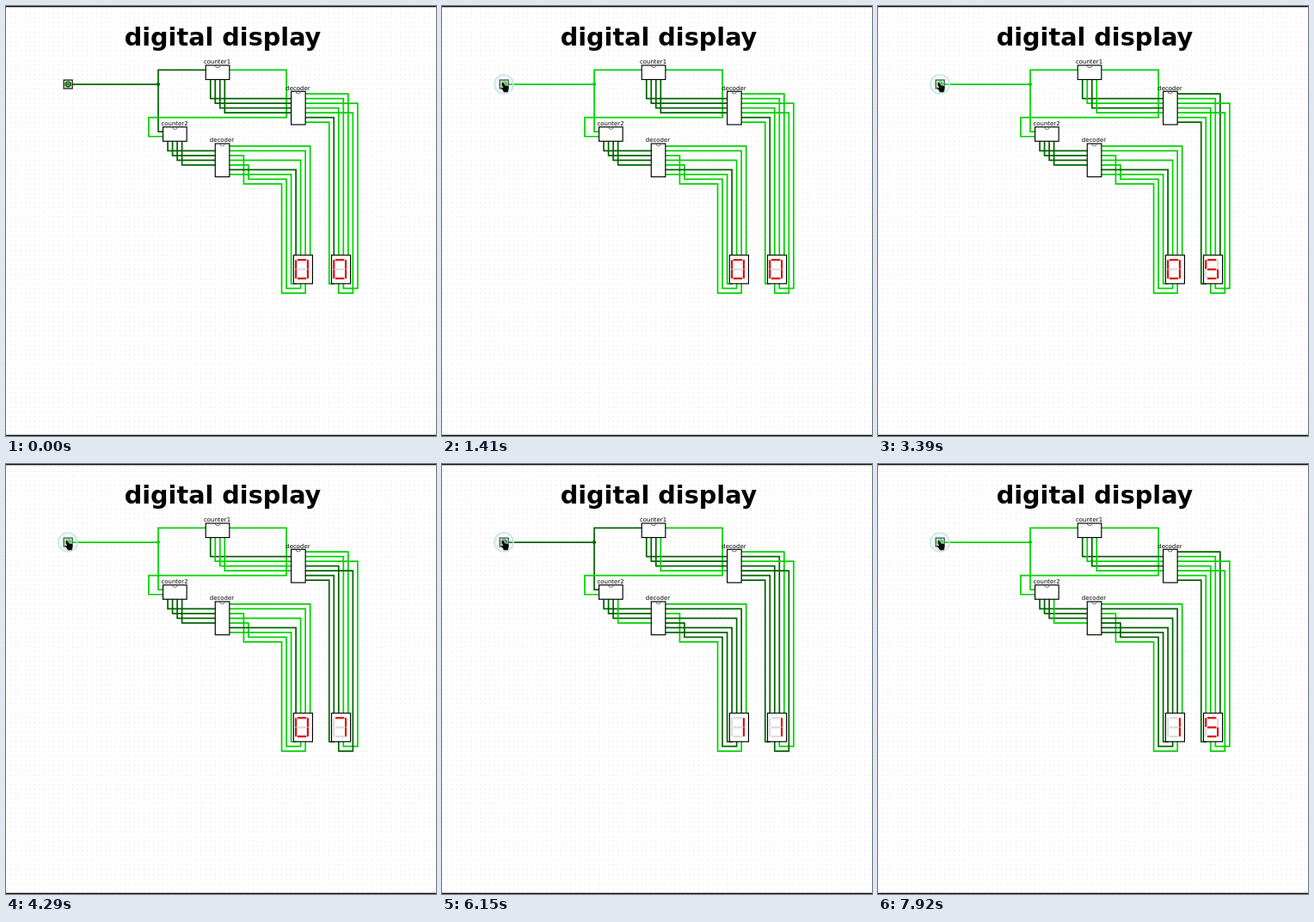
An HTML page for the animation above (8 s loop, 500 by 500 pixels).

```html
<!DOCTYPE html>
<html lang="en">
<head>
<meta charset="utf-8">
<title>digital display</title>
<style>
  html, body { margin: 0; width: 100%; height: 100%; overflow: hidden; background: #fff; }
  svg { display: block; width: 100vw; height: 100vh; }
  text { font-family: "DejaVu Sans", sans-serif; text-anchor: middle; fill: #000; }
  .title { font-size: 28.7px; font-weight: bold; }
  .label { font-size: 6.95px; }
  .wire { fill: none; stroke: #006400; stroke-width: .31; stroke-linecap: square; }
  .wire.on { stroke: #00d200; }
  .node { fill: #006400; }
  .node.on { fill: #00d200; }
  .box { fill: #fff; stroke: #000; stroke-width: .21; }
  .notch { fill: none; stroke: #555; stroke-width: .15; }
  .seg { fill: #dcdcdc; }
  .seg.on { fill: #dc0f0f; }
  .bit { font-size: 1.1px; fill: #fff; }
</style>
</head>
<body>
<svg viewBox="0 0 500 500">
  <defs>
    <pattern id="dots" x="-.1" y="2.2" width="5.52" height="5.52" patternUnits="userSpaceOnUse">
      <rect width="1" height="1" fill="#d8d8d8"/>
    </pattern>
  </defs>
  <rect width="500" height="500" fill="#fff"/>
  <rect width="500" height="500" fill="url(#dots)"/>
  <rect width="500" height="1.3" fill="#111"/>
  <rect y="498.7" width="500" height="1.3" fill="#111"/>
  <text class="title" x="252" y="46">digital display</text>

  <!-- one unit is one grid step -->
  <g transform="translate(.4 2.7) scale(5.52)">
    <g id="wires"></g>
    <g id="parts"></g>
  </g>

  <text class="label" x="245.5" y="67.3">counter1</text>
  <text class="label" x="196" y="138.8">counter2</text>
  <text class="label" x="339.5" y="97.8">decoder</text>
  <text class="label" x="251" y="158.4">decoder</text>

  <g id="cursor" visibility="hidden">
    <circle r="11" fill="#c8f0ea" fill-opacity=".25" stroke="#c4e8e4" stroke-width="1.6"/>
    <path d="M-2.6-1.6Q-1.4-3 .1-1.6L1.6 1.2 4.8 1.4Q6 1.8 6 3.2L5.6 6.6 4.6 9.4-.4 9.6-1.4 7-4 4.6Q-4.2 3-2.6 3.4L-1.2 4-2.8 .2Z"
      fill="#0a0a0a" stroke="#fff" stroke-width=".5"/>
  </g>
</svg>
<script>
const LOOP = 8000;
// times at which the input pin flips
const FLIPS = [
  1380, 1590, 1830, 2040, 2280, 2490, 2730, 2940, 3150, 3270, 3370,
  3540, 3810, 4050, 4260, 4710, 4920, 5130, 5370, 5640, 5820, 6030,
  6270, 6480, 6720, 6990, 7140, 7320, 7500, 7680, 7860
];
const DIGITS = ["abcdef", "bc", "abdeg", "abcdg", "bcfg", "acdfg", "acdefg", "abc", "abcdefg", "abcdfg"];
// x, y, width, height in tenths of a grid step
const SEGMENTS = {
  a: [8, 8, 19, 4], b: [28, 10, 4, 19], c: [28, 30, 4, 19], d: [8, 47, 19, 4],
  e: [3, 30, 4, 19], f: [3, 10, 4, 19], g: [8, 28, 19, 4]
};

const byId = id => document.getElementById(id);
const wires = byId("wires"), parts = byId("parts"), cursor = byId("cursor");

function add(parent, tag, attrs) {
  const el = document.createElementNS("http://www.w3.org/2000/svg", tag);
  for (const k in attrs) el.setAttribute(k, attrs[k]);
  return parent.appendChild(el);
}
const wire = d => add(wires, "path", { class: "wire", d });
const box = (x, y, width, height) => add(parts, "rect", { class: "box", x, y, width, height });
const light = (el, on) => el.classList.toggle("on", on);

function chip(x, y, w, h) {
  box(x, y, w, h);
  add(parts, "path", { class: "notch", d: `M${x + w / 2 - .5} ${y}a.5.5 0 0 0 1 0` });
}

// four wires from a counter to a decoder, highest bit first
const bus = (x, y, row, end) => [0, 1, 2, 3].map(i => wire(`M${x + i} ${y}V${row + i}H${end}`));

// wires from a decoder's right side at (x, y) to a display at column col
function outputs(x, y, col, c, d) {
  const drop = (row, to) => wire(`M${x} ${y + row}H${to}V52`);
  return {
    b: drop(0, col + 3.5), a: drop(1, col + 2.5), c: wire(`M${x} ${y + 2}${c}`),
    f: drop(3, col + 1.5), d: wire(`M${x} ${y + 4}${d}`), g: drop(5, col + .5),
    e: wire(`M${x} ${y + 6}H${col - .5}V58H${col + .5}`)
  };
}

function display(x, y) {
  box(x, y, 4, 6);
  const segs = {};
  for (const s in SEGMENTS) {
    const [sx, sy, w, h] = SEGMENTS[s].map(v => v / 10);
    segs[s] = add(parts, "rect", { class: "seg", x: x + sx, y: y + sy, width: w, height: h });
  }
  return segs;
}

const clock = [wire("M14 16H32"), wire("M42 13H32V26H33")];
const carry = wire("M47 13H59V23H30V27H33");
const ones = {
  bits: bus(43, 15, 19, 60),
  out: outputs(63, 18, 68.5, "H74V59H71V58", "H73V60H70V58")
};
const tens = {
  bits: bus(34, 28, 30, 44),
  out: outputs(47, 29, 60.5, "H50V37H58V60H63V58", "H51V36H59V59H62V58")
};

chip(42, 12, 5, 3);
chip(33, 25, 5, 3);
chip(60, 17.5, 3, 7);
chip(44, 28.5, 3, 7);
ones.segs = display(68.5, 52);
tens.segs = display(60.5, 52);
box(12.1, 15.1, 1.8, 1.8);
clock.push(add(parts, "circle", { class: "node", cx: 13, cy: 16, r: .68 }));
clock.push(add(parts, "circle", { class: "node", cx: 32, cy: 16, r: .38 }));
const pinText = add(parts, "text", { class: "bit", x: 13, y: 16.4 });

function show(unit, n) {
  unit.bits.forEach((el, i) => light(el, !!(n >> (3 - i) & 1)));
  for (const s in SEGMENTS) {
    const on = DIGITS[n].includes(s);
    light(unit.out[s], on);
    light(unit.segs[s], on);
  }
}

const ease = (t, from, to) => {
  const p = Math.min(1, Math.max(0, (t - from) / (to - from)));
  return p * p * (3 - 2 * p);
};

function draw() {
  const t = performance.now() % LOOP;
  const flips = FLIPS.filter(f => f <= t).length;
  const high = flips % 2 === 1, count = flips >> 1;

  clock.forEach(el => light(el, high));
  pinText.textContent = high ? "1" : "0";
  light(carry, count % 10 !== 9);
  show(ones, count % 10);
  show(tens, Math.floor(count / 10));

  const go = ease(t, 0, 780), settle = ease(t, 840, 1380);
  const x = 492 - 417 * go - 3 * settle, y = 130 - 38 * go - settle;
  cursor.setAttribute("transform", `translate(${x} ${y})`);
  cursor.setAttribute("visibility", t < 30 ? "hidden" : "visible");
  requestAnimationFrame(draw);
}
draw();
</script>
</body>
</html>
```
